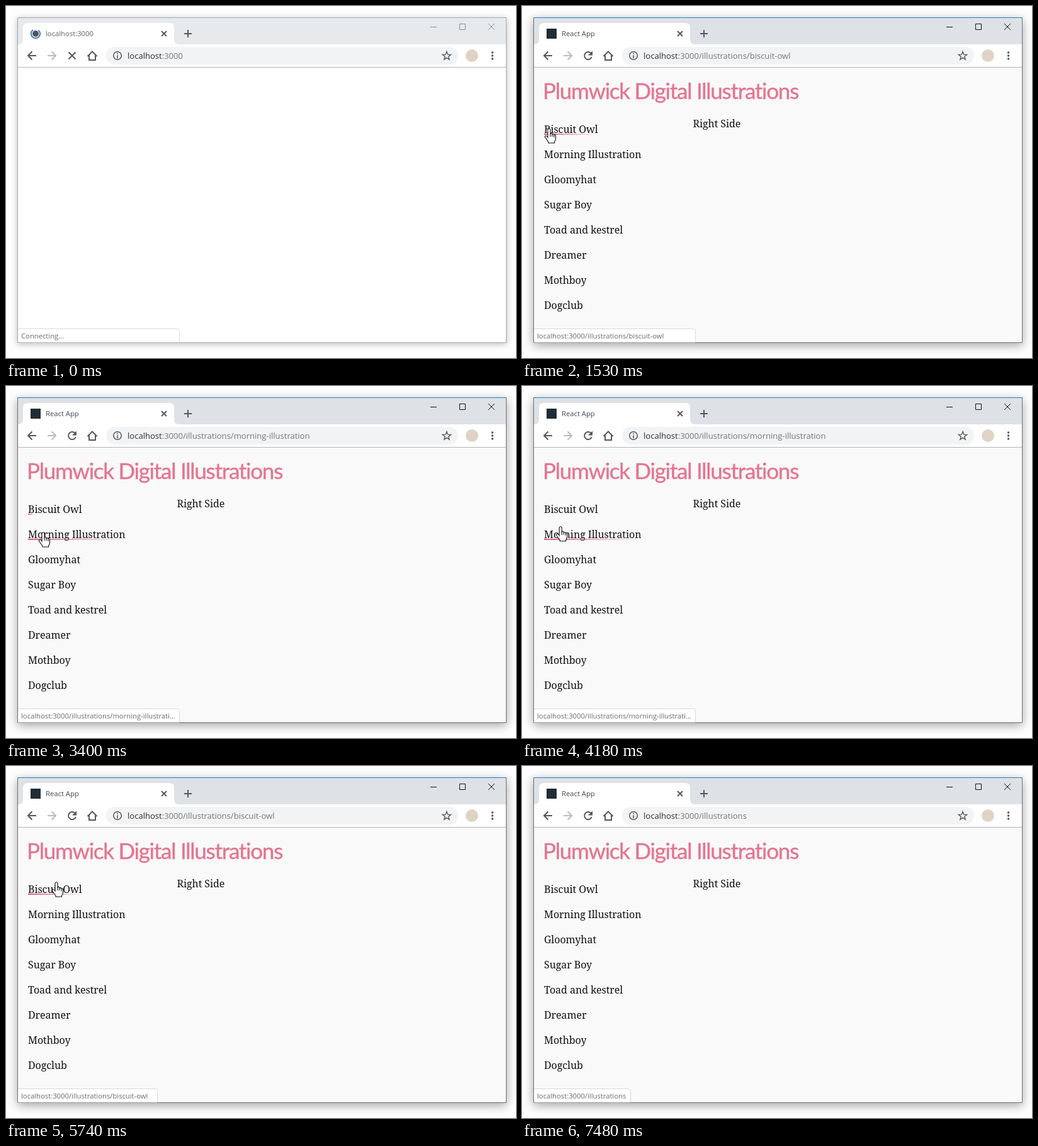
Write an HTML page that moves like this. It is 810 px wide and 560 px high and loops after 7.71 s.

```html
<!DOCTYPE html>
<html lang="en">
<head>
<meta charset="utf-8">
<title>Illustrations demo</title>
<style>
  html, body { margin: 0; width: 100%; height: 100%; overflow: hidden; background: #fefefe; }
  #win {
    position: absolute; left: 18px; top: 18px; width: 775px; height: 516px;
    border: 1px solid #a8a9ab; background: #fff;
    box-shadow: 0 2px 10px rgba(0, 0, 0, .27);
  }
  #win.active {
    border-color: #6e7073; border-top-color: #1b83c8;
    box-shadow: 0 4px 15px rgba(0, 0, 0, .36);
  }
  svg { position: absolute; left: 0; top: 0; display: block; }
  .ui { font-family: "Open Sans", "Noto Sans", sans-serif; }
  .small { font-size: 11.25px; }
  .url { font-size: 13.05px; fill: #72777c; }
  .page { font: 16px "Noto Serif", serif; letter-spacing: -.06px; fill: #111; }
  .title {
    font: 35px Lato, sans-serif; letter-spacing: -1.25px;
    fill: #e5748f; stroke: #e5748f; stroke-width: .4;
  }
  .line { fill: none; stroke: #54575c; stroke-width: 2; }
</style>
</head>
<body>
<div id="win"></div>
<svg width="810" height="560" viewBox="0 0 810 560">
  <defs>
    <linearGradient id="fade">
      <stop offset="0" stop-color="#dd5c7e"/>
      <stop offset="1" stop-color="#dd5c7e" stop-opacity="0"/>
    </linearGradient>
  </defs>

  <!-- tab strip -->
  <rect id="strip" x="19" y="19" width="775" height="42"/>
  <path fill="#fff" d="M19 61Q27 61 27 53V35Q27 27 35 27H259Q267 27 267 35V53Q267 61 275 61Z"/>
  <g id="spinner">
    <circle cx="47" cy="44" r="5" fill="#4b5560"/>
    <path id="arc" fill="none" stroke="#4377b4" stroke-width="2" d="M43 38A7.2 7.2 0 1 0 51.5 38.4"/>
  </g>
  <rect id="favicon" x="39" y="36" width="16" height="16" fill="#222c35"/>
  <text id="tab" class="ui small" x="63" y="48"></text>
  <path class="line" stroke-width="1.6" d="M247 40l8 8m0-8l-8 8M289 38v12m-6-6h12"/>
  <path id="controls" fill="none" d="M674 33.5h10M720.5 28.5h9v9h-9zM766 28l10 10m0-10l-10 10"/>

  <!-- toolbar -->
  <rect x="19" y="61" width="775" height="36" fill="#fff"/>
  <path class="line" d="M48 79H35m6.5-6.5L35 79l6.5 6.5"/>
  <path class="line" style="stroke:#b9bbbe" d="M66 79h13m-6.5-6.5L79 79l-6.5 6.5"/>
  <path id="stop" class="line" d="M99.5 73.5l11 11m0-11l-11 11"/>
  <g id="reload">
    <path class="line" d="M109.5 75A6 6 0 1 0 110.8 81"/>
    <path fill="#54575c" d="M112 71.5v7h-7z"/>
  </g>
  <path class="line" d="M129.5 80L137 72.5L144.5 80M132 78.5V86h10V78.5"/>
  <rect x="159" y="65" width="559" height="28" rx="14" fill="#f1f3f4"/>
  <circle class="line" style="stroke-width:1.5" cx="177" cy="79" r="6.3"/>
  <path class="line" style="stroke-width:1.6" d="M177 75v1.7m0 1.5v5"/>
  <text class="ui url" x="193" y="84"><tspan fill="#2b2f33">localhost</tspan>:3000<tspan id="path"></tspan></text>
  <path id="star" class="line" style="stroke-width:1.4"/>
  <circle cx="740" cy="79" r="10" fill="#dfd3c5"/>
  <g fill="#54575c">
    <circle cx="772.5" cy="74" r="1.7"/><circle cx="772.5" cy="79" r="1.7"/><circle cx="772.5" cy="84" r="1.7"/>
  </g>
  <rect x="19" y="97" width="775" height="1" fill="#b3b4b6"/>

  <!-- page -->
  <g id="page">
    <rect x="19" y="98" width="775" height="437" fill="#f9f9f9"/>
    <text class="title" x="33" y="148">Plumwick Digital Illustrations</text>
    <text class="page" x="271.5" y="193">Right Side</text>
    <g id="list" class="page"></g>
    <rect id="line1" x="35" y="203" height="2" fill="url(#fade)"/>
    <rect id="line2" x="35" y="243" height="2" fill="url(#fade)"/>
  </g>

  <!-- status bubble -->
  <g id="status">
    <path id="bubble" fill="#fff" stroke="#d8d9db"/>
    <text id="hint" class="ui small" x="24" y="529" fill="#686b70"></text>
  </g>

  <!-- pointer -->
  <g id="pointer">
    <circle id="click" cx="-1" r="14" fill="#fbf12c"/>
    <path id="arrow" fill="#fff" stroke="#111" d="M0 0V16.5L3.8 12.9L6.2 18.5L8.6 17.5L6.2 12H11.5Z"/>
    <g id="hand" stroke="#111" stroke-width="1.1">
      <path fill="#fff" d="M-2 14V2Q-2 0 0 0Q2 0 2 2V8Q4.5 6.5 5 9Q7.5 8 8 10Q10.5 9 10.5 12V16Q10.5 19 8.5 21V23H-1V21.5L-6 14.5Q-7.5 12 -5.5 11.5Q-4 11 -2 14Z"/>
      <path fill="none" d="M2 8v5M5 9v4M8 10v4"/>
    </g>
  </g>
</svg>
<script>
const LOOP = 7710, GROW = 800, SHRINK = 1500;
const $ = id => document.getElementById(id);
const show = (id, on) => $(id).setAttribute('visibility', on ? 'visible' : 'hidden');
const clamp = v => Math.max(0, Math.min(1, v));

const base = '/illustrations', owl = base + '/biscuit-owl', morning = base + '/morning-illustration';
const host = 'localhost:3000';
const items = ['Biscuit Owl', 'Morning Illustration', 'Gloomyhat', 'Sugar Boy',
  'Toad and kestrel', 'Dreamer', 'Mothboy', 'Dogclub'];

// Each row starts at its time and holds until the next one.
const paths = [[0, ''], [1500, owl], [3320, morning], [4870, owl], [6610, base]];
const hints = [[0, 'Connecting...', 276], [540, '', 0], [950, host + owl, 276],
  [2540, host + morning.slice(0, -2) + '...', 276], [4300, host + owl, 276],
  [4490, host + owl, 241], [5825, host + base, 173]];
const hands = [[0, false], [950, true], [2490, false], [2540, true], [4230, false],
  [4300, true], [5790, false], [5825, true], [7270, false]];
const clicks = [[1380, 1500], [3090, 3320], [4650, 4870], [6390, 6610]];
const track = [[620, 10, 206], [840, 31, 198], [920, 31, 198], [1300, 43, 195],
  [2410, 43, 195], [2770, 59, 233], [4020, 59, 233], [4490, 67, 199], [5700, 67, 199],
  [5740, 80, 185], [6060, 94, 144], [6200, 95, 143], [7100, 95, 143], [7440, 28, 187]];
const hovers1 = [[950, 2490], [4300, 5790]];
const hovers2 = [[2540, 4230]];

const at = (rows, t) => rows.filter(r => r[0] <= t).pop() || rows[0];

function pointAt(t) {
  const i = track.findIndex(k => k[0] > t);
  if (i < 1) return (i ? track[track.length - 1] : track[0]).slice(1);
  const [t0, x0, y0] = track[i - 1], [t1, x1, y1] = track[i];
  const u = (t - t0) / (t1 - t0), k = u * u * (3 - 2 * u);
  return [x0 + (x1 - x0) * k, y0 + (y1 - y0) * k];
}

// CSS "ease": cubic-bezier(.25, .1, .25, 1)
function ease(x) {
  const bez = (a, b, s) => 3 * a * s * (1 - s) ** 2 + 3 * b * s * s * (1 - s) + s ** 3;
  let lo = 0, hi = 1;
  for (let i = 0; i < 20; i++) {
    const mid = (lo + hi) / 2;
    if (bez(.25, .25, mid) < x) lo = mid; else hi = mid;
  }
  return bez(.1, 1, lo);
}

function underline(id, width, hovers, t) {
  const [from, to] = at(hovers, t);
  const part = t < from ? 0
    : t < to ? ease(clamp((t - from) / GROW))
    : 1 - ease(clamp((t - to) / SHRINK));
  $(id).setAttribute('width', width * part);
}

function setText(id, text) {
  if ($(id).textContent !== text) $(id).textContent = text;
}

function draw(t) {
  const active = t >= 1380, loading = t < 300, tint = active ? '#dee1e6' : '#e7eaec';
  $('win').className = active ? 'active' : '';
  $('strip').setAttribute('fill', tint);
  $('controls').setAttribute('stroke', active ? '#111' : '#8d8f92');
  $('tab').setAttribute('fill', active ? '#45494e' : '#5f6368');
  setText('tab', t < 70 ? host : 'React App');
  show('spinner', loading);
  show('favicon', !loading);
  show('stop', loading);
  show('reload', !loading);
  $('arc').setAttribute('transform', `rotate(${t * .36} 47 44)`);
  setText('path', at(paths, t)[1]);
  show('page', t >= 540);

  underline('line1', 85, hovers1, t);
  underline('line2', 153, hovers2, t);

  const [, hint, right] = at(hints, t);
  show('status', right > 0);
  setText('hint', hint);
  $('bubble').setAttribute('d', `M19 513.5H${right - 4.5}q4 0 4 4V535H19`);

  const [x, y] = pointAt(t), seen = t >= 620 && t < 7480, hand = at(hands, t)[1];
  $('pointer').setAttribute('transform', `translate(${x} ${y})`);
  show('arrow', seen && !hand);
  show('hand', seen && hand);
  const [down, up] = at(clicks, t);
  show('click', t >= down && t < up);
  $('click').setAttribute('opacity', .65 * clamp((up - t) / 70));
}

$('list').innerHTML = items.map((s, i) => `<text x="35" y="${202 + 40 * i}">${s}</text>`).join('');
$('star').setAttribute('d', 'M' + Array.from({ length: 10 }, (_, i) => {
  const r = i % 2 ? 2.9 : 7, a = Math.PI * (i / 5 - .5);
  return `${700 + r * Math.cos(a)} ${79.5 + r * Math.sin(a)}`;
}).join('L') + 'Z');

const start = performance.now();
function tick() {
  draw((performance.now() - start) % LOOP);
  requestAnimationFrame(tick);
}
draw(0);
requestAnimationFrame(tick);
</script>
</body>
</html>
```
